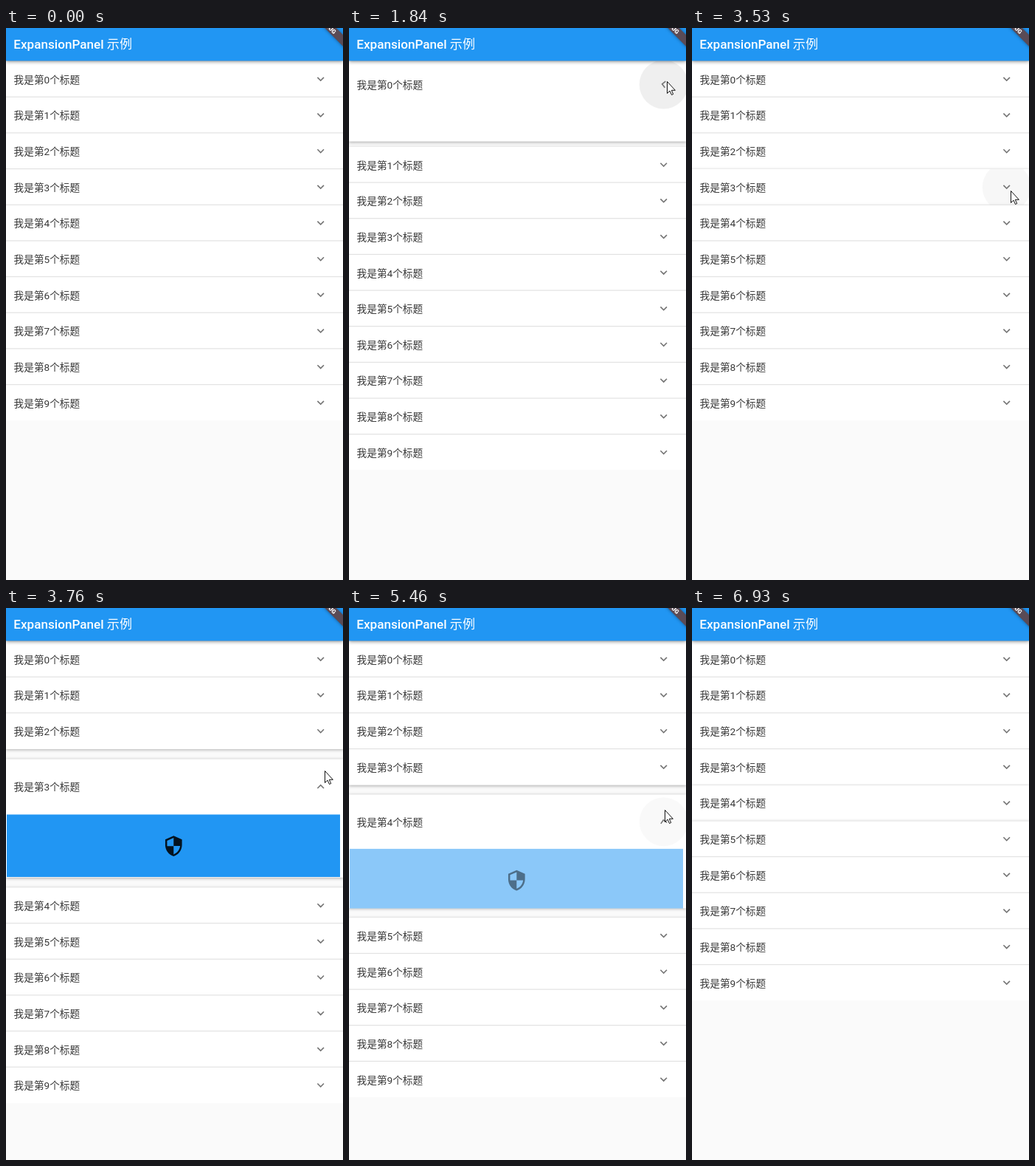
Animation of 457 by 747 pixels, one loop 7.33 s. Source, as an HTML page with a canvas:

```html
<!DOCTYPE html>
<html lang="zh">
<head>
<meta charset="utf-8">
<style>
  html, body { margin: 0; height: 100%; overflow: hidden; background: #fafafa; }
  canvas { display: block; }
</style>
</head>
<body>
<canvas id="stage" width="457" height="747"></canvas>
<script>
const W = 457, H = 747, LOOP = 7330;
const FIRST = 290, STEP = 77.2;
const TOP = 45, ROW = 48.66, HEADER = 75, CONTENT = 85.3, GAP = 13.5, COUNT = 10;
const DURATION = 200;
const BLUE = '#2196f3';
const SANS = 'Roboto, "Noto Sans CJK SC", "Noto Sans CJK", sans-serif';
const ctx = document.getElementById('stage').getContext('2d');

const chevron = new Path2D('M16.59 8.59 12 13.17 7.41 8.59 6 10l6 6 6-6z');
const shield = new Path2D('M12 1 3 5v6c0 5.55 3.84 10.74 9 12 5.16-1.26 9-6.45 9-12V5l-9-4zm0 10.99h7c-.53 4.12-3.28 7.79-7 8.94V12H5V6.3l7-3.11v8.8z');
const arrow = new Path2D('M.5.5V16.5l3.5-3.4 2.5 5.4 2.2-1-2.4-5.2h5.1z');

const taps = [
  { panel: 0, press: 1761, start: 1761, opens: true },
  { panel: 0, press: 2440, start: 2484, opens: false },
  { panel: 3, press: 3520, start: 3545, opens: true },
  { panel: 3, press: 4525, start: 4548, opens: false },
  { panel: 4, press: 5300, start: 5320, opens: true },
  { panel: 4, press: 5765, start: 5815, opens: false },
];

// Pointer moves: start time, end time, destination
const pointerStart = [201, 717];
const moves = [
  [290, 985, 343, 61], [985, 1371, 426, 69], [1448, 1602, 431, 72],
  [2683, 3069, 431, 239], [3146, 3378, 432, 220], [3996, 4459, 428, 238],
  [4922, 5154, 428, 273], [6312, 6929, 399, 757],
];

const clamp = x => Math.min(1, Math.max(0, x));
const smooth = x => x * x * (3 - 2 * x);

// cubic-bezier(0.4, 0, 0.2, 1)
function ease(x) {
  let lo = 0, hi = 1;
  for (let i = 0; i < 20; i++) {
    const u = (lo + hi) / 2, v = 1 - u;
    if (1.2 * u * v * v + 0.6 * u * u * v + u * u * u < x) lo = u; else hi = u;
  }
  return smooth(lo);
}

function panelState(time) {
  const tap = taps.filter(e => time >= e.press).pop();
  if (!tap) return { panel: -1, size: 0, gap: 0, fade: 0, splash: 0 };
  const t = clamp((time - tap.start) / DURATION);
  const value = tap.opens ? t : 1 - t;
  return {
    panel: tap.panel,
    size: tap.opens ? ease(t) : 1 - ease(t),
    gap: ease(value),
    fade: clamp((value - 0.4) / 0.6),
    splash: t > 0 ? Math.max(0, 0.11 * (0.92 - t)) : 0.03,
  };
}

function pointerAt(time) {
  let [x, y] = pointerStart;
  for (const [from, to, toX, toY] of moves) {
    const p = smooth(clamp((time - from) / (to - from)));
    x += (toX - x) * p;
    y += (toY - y) * p;
  }
  return [Math.round(x), Math.round(y)];
}

function rect(color, x, y, w, h) {
  ctx.fillStyle = color;
  ctx.fillRect(x, y, w, h);
}

function shadow(color, blur, offsetY) {
  ctx.shadowColor = color;
  ctx.shadowBlur = blur;
  ctx.shadowOffsetY = offsetY;
}

function text(string, x, y, font, color) {
  ctx.font = `${font} ${SANS}`;
  ctx.fillStyle = color;
  ctx.fillText(string, x, y);
}

function icon(path, x, y, scale, angle, color) {
  ctx.save();
  ctx.translate(x, y);
  ctx.rotate(angle);
  ctx.scale(scale, scale);
  ctx.translate(-12, -12);
  ctx.fillStyle = color;
  ctx.fill(path);
  ctx.restore();
}

function card(y, h) {
  ctx.save();
  shadow('rgba(0,0,0,.3)', 4, 1);
  rect('#fff', 0, y, W, h);
  ctx.restore();
}

function header(index, center, turn) {
  text(`我是第${index}个标题`, 10.6, center + 5.4, '13.65px', '#383838');
  icon(chevron, 426.7, center - 0.2, 0.81, turn * Math.PI, '#757575');
}

function rows(from, to, y) {
  if (from >= to) return y;
  card(y, (to - from) * ROW);
  for (let i = from; i < to; i++) {
    header(i, y + ROW / 2, 0);
    y += ROW;
    if (i < to - 1) rect('#e2e2e2', 0, y - 1, W, 1.2);
  }
  return y;
}

function openPanel(state, y) {
  const head = ROW + (HEADER - ROW) * state.size;
  const body = CONTENT * state.size;
  const center = y + head / 2;
  card(y, head + body);
  ctx.save();
  ctx.beginPath();
  ctx.rect(0, y, W, head + body);
  ctx.clip();
  ctx.fillStyle = `rgba(0,0,0,${state.splash})`;
  ctx.beginPath();
  ctx.arc(426.7, center, 33, 0, 7);
  ctx.fill();
  ctx.globalAlpha = state.fade;
  rect(BLUE, 1, y + head, 452, CONTENT - 0.8);
  icon(shield, 227.3, y + head + CONTENT / 2, 1.26, 0, 'rgba(0,0,0,.87)');
  ctx.restore();
  header(state.panel, center, state.gap);
  return y + head + body;
}

function list(state) {
  const { panel } = state;
  const gap = GAP * state.gap;
  const resting = panel < 0 || (state.size === 0 && state.splash === 0);
  const extra = resting ? 0
    : (HEADER - ROW + CONTENT) * state.size + gap * (panel ? 2 : 1);
  ctx.save();
  ctx.beginPath();
  ctx.rect(0, 0, W, Math.floor(TOP + COUNT * ROW + extra));
  ctx.clip();
  if (resting) {
    rows(0, COUNT, TOP);
  } else {
    let y = rows(0, panel, TOP);
    y = openPanel(state, panel ? y + gap : y);
    rows(panel + 1, COUNT, y + gap);
  }
  ctx.restore();
}

function appBar() {
  ctx.save();
  shadow('rgba(0,0,0,.45)', 5, 2);
  rect(BLUE, 0, 0, W, 44.4);
  ctx.restore();
  text('ExpansionPanel 示例', 10.3, 28, '500 17.1px', '#fff');

  ctx.save();
  ctx.translate(437.5, -2.5);
  ctx.rotate(Math.PI / 4);
  shadow('rgba(0,0,0,.4)', 4, 0);
  rect('#5a4b56', -40, -5.5, 80, 11);
  shadow('transparent', 0, 0);
  ctx.textAlign = 'center';
  text('DEBUG', 0, 3, '900 8px', '#fff');
  ctx.restore();
}

function pointer(time) {
  ctx.save();
  ctx.translate(...pointerAt(time));
  ctx.fillStyle = '#fff';
  ctx.strokeStyle = '#111';
  ctx.lineJoin = 'round';
  ctx.fill(arrow);
  ctx.stroke(arrow);
  ctx.restore();
}

function draw(now) {
  const tick = Math.floor((now % LOOP - FIRST + 22) / STEP);
  const time = FIRST + tick * STEP;
  rect('#fafafa', 0, 0, W, H);
  list(panelState(time));
  appBar();
  if (tick >= 0 && tick < 86) pointer(time);
  requestAnimationFrame(draw);
}
requestAnimationFrame(draw);
</script>
</body>
</html>
```
